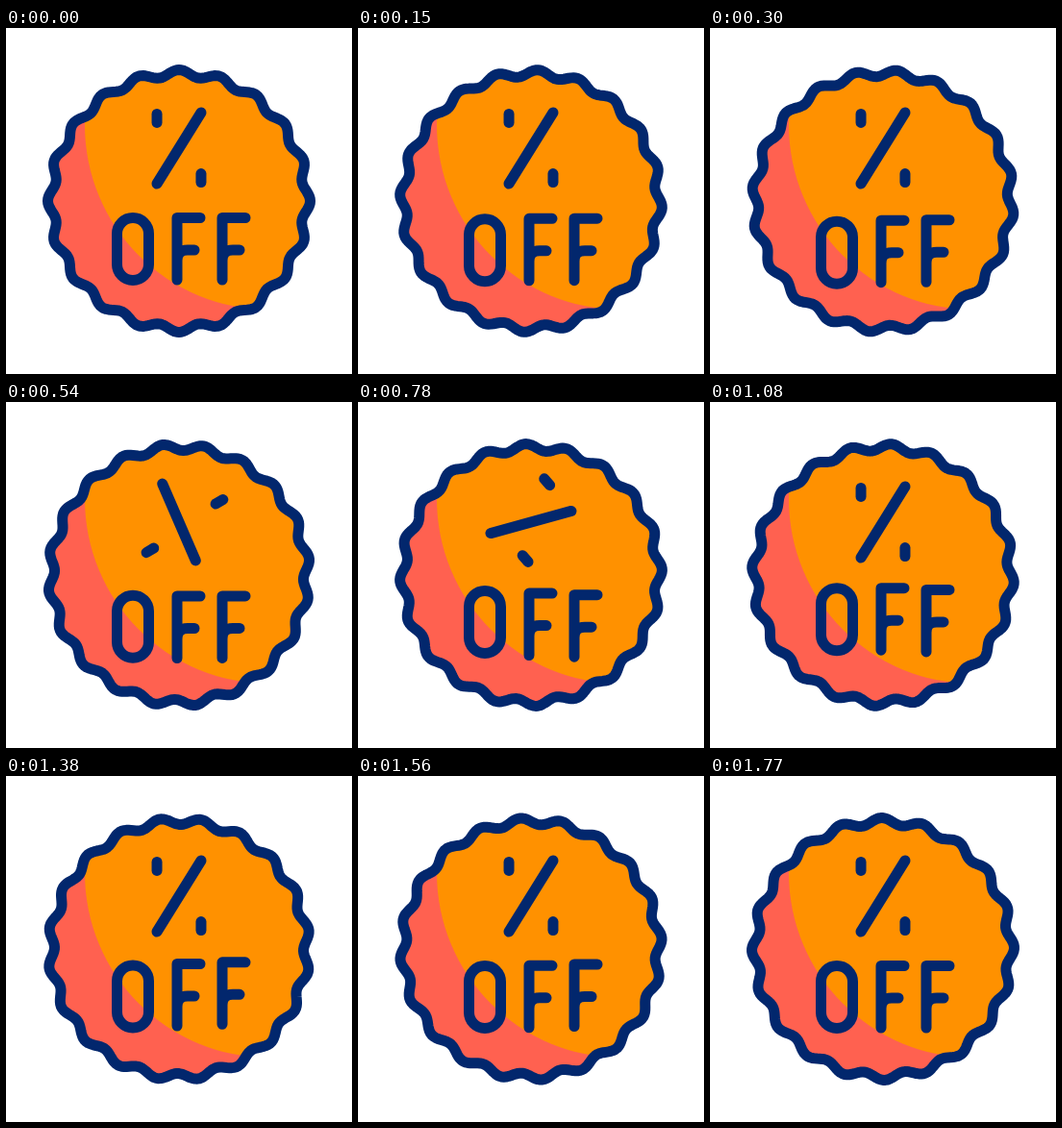
Recreate the animation shown at these times as an HTML page. Size 360 by 360 pixels, loop 1800 ms.

```html
<!DOCTYPE html>
<html lang="en">
<head>
<meta charset="utf-8">
<title>Percent off badge</title>
<style>
  html, body { margin: 0; width: 100%; height: 100%; overflow: hidden; background: #fff; }
  svg { display: block; width: 100vw; height: 100vh; }
  .ink { fill: none; stroke: #02276d; stroke-width: 11; stroke-linecap: round; stroke-linejoin: round; }
</style>
</head>
<body>
<svg viewBox="0 0 360 360" role="img" aria-label="% OFF">
  <clipPath id="inside"><path class="edge"/></clipPath>
  <g clip-path="url(#inside)">
    <rect width="360" height="360" fill="#ff6150"/>
    <circle cx="274" cy="101" r="192" fill="#ff9100"/>
  </g>
  <g class="ink">
    <path class="edge"/>
    <path id="slash" d="M203 88L157 162"/>
    <path class="pill" d="M0 -4.5V4.5"/>
    <path class="pill" d="M0 -4.5V4.5"/>
    <rect class="letter" x="115.5" y="197.5" width="33" height="65" rx="16.5"/>
    <path class="letter" d="M202 197.5H178V262M178 242Q178 231 189 231H196"/>
    <path class="letter" d="M249 197.5H225V262M225 242Q225 231 236 231H243"/>
  </g>
</svg>
<script>
const LOOP = 1800, LOBES = 20, TURN = 36;
const CX = 180, CY = 125;
const all = s => [...document.querySelectorAll(s)];
const edges = all('.edge'), pills = all('.pill'), letters = all('.letter');
const slash = document.getElementById('slash');

// Degrees and radii at the moments of the percent sign's half turn
const spinTimes = [300, 540, 780, 1000];
const slashTurn = [0, -55, -137, -180];
const pillSpin = [0, 59, 139, 180];
const pillPaths = [
  { angle: [233.5, 136, 99, 53.5], radius: [38.6, 42, 38.5, 38.6] },
  { angle: [53.5, -26.6, -68, -126.5], radius: [38.6, 47, 45, 38.6] }
];

// Each letter dips, rises and settles a little after the one before
const bob = [0, 4.5, -4, 0];
const bobTimes = [[0, 420, 1020, 1500], [0, 540, 1140, 1620], [0, 600, 1300, 1750]];

const rad = d => d * Math.PI / 180;

function span(t, times) {
  const i = times.findIndex((s, k) => k + 1 < times.length && t < times[k + 1]);
  return { i, p: (t - times[i]) / (times[i + 1] - times[i]) };
}

// Smooth curve through all values, at rest at both ends
function curve(t, times, v) {
  const last = times.length - 1;
  if (t <= times[0]) return v[0];
  if (t >= times[last]) return v[last];
  const { i, p } = span(t, times), h = times[i + 1] - times[i];
  const slope = k => k === 0 || k === last ? 0 : (v[k + 1] - v[k - 1]) / (times[k + 1] - times[k - 1]);
  const q = 1 - p;
  return v[i] * (1 + 2 * p) * q * q + slope(i) * h * p * q * q
    + v[i + 1] * p * p * (3 - 2 * p) - slope(i + 1) * h * p * p * q;
}

// Stops at every value
function swing(t, times, v) {
  if (t >= times[times.length - 1]) return v[v.length - 1];
  const { i, p } = span(t, times);
  return v[i] + (v[i + 1] - v[i]) * (1 - Math.cos(Math.PI * p)) / 2;
}

function scallop(turn) {
  const pts = [];
  for (let a = 0; a < 360; a++) {
    const r = 133 + 3.5 * Math.cos(rad(LOBES * (a - turn)));
    pts.push((180 + r * Math.cos(rad(a))).toFixed(2) + ' ' + (180 + r * Math.sin(rad(a))).toFixed(2));
  }
  return 'M' + pts.join('L') + 'Z';
}

function draw(now) {
  const t = now % LOOP;
  const outline = scallop(TURN * t / LOOP);
  edges.forEach(e => e.setAttribute('d', outline));
  slash.setAttribute('transform', `rotate(${curve(t, spinTimes, slashTurn)} ${CX} ${CY})`);
  pills.forEach((pill, k) => {
    const a = rad(curve(t, spinTimes, pillPaths[k].angle));
    const r = curve(t, spinTimes, pillPaths[k].radius);
    const x = CX + r * Math.cos(a), y = CY + r * Math.sin(a);
    pill.setAttribute('transform', `translate(${x} ${y}) rotate(${curve(t, spinTimes, pillSpin)})`);
  });
  letters.forEach((l, k) => l.setAttribute('transform', `translate(0 ${swing(t, bobTimes[k], bob)})`));
}

const start = performance.now();
function tick() {
  draw(performance.now() - start);
  requestAnimationFrame(tick);
}
tick();
</script>
</body>
</html>
```
